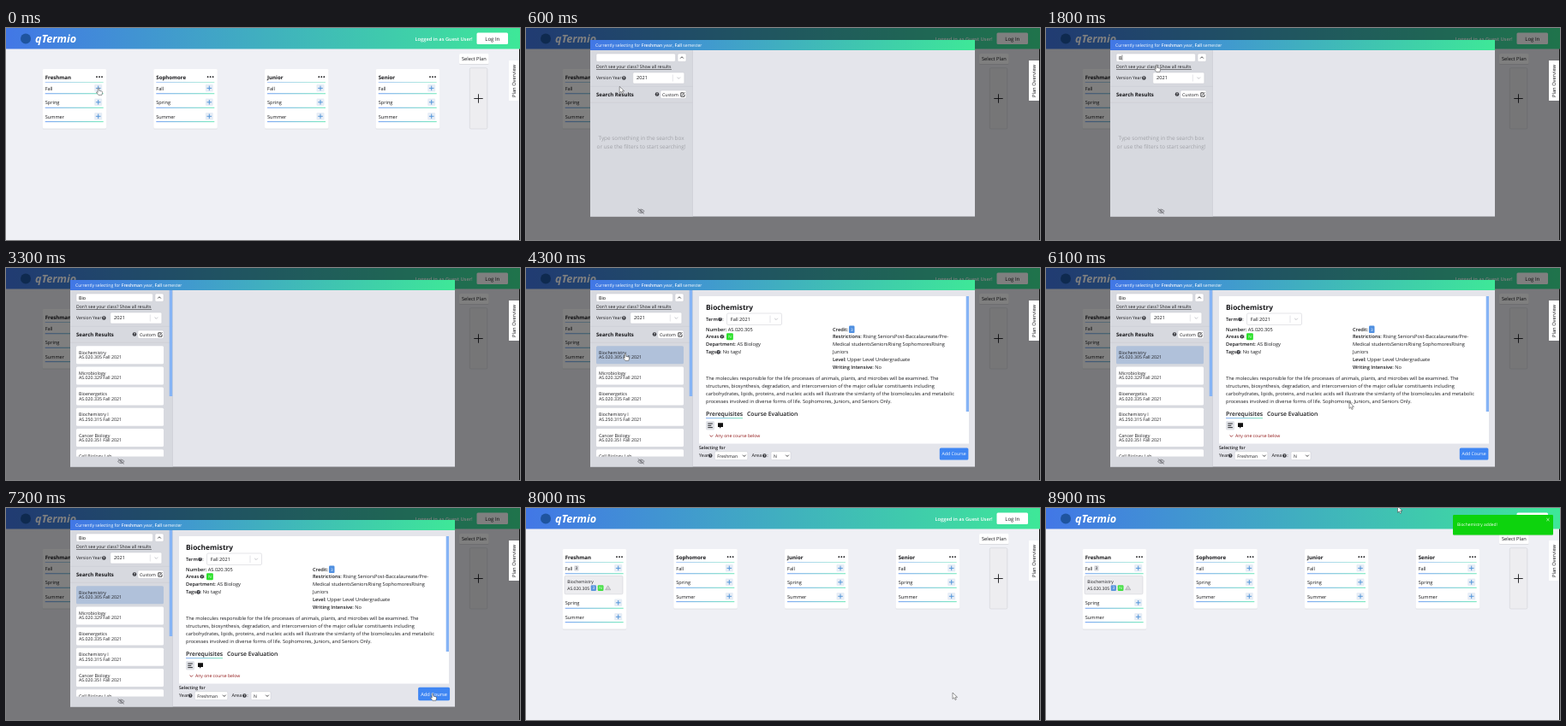
Animation, 600 px wide and 248 px high, one loop 9 s. Source, as an HTML page:

```html
<!DOCTYPE html>
<html lang="en">
<head>
<meta charset="utf-8">
<title>Course planner</title>
<style>
  html, body { margin: 0; width: 100%; height: 100%; overflow: hidden; background: #eff0f5; }
  svg { display: block; width: 100%; height: 100%; }
  text { font-family: "Open Sans", "Noto Sans", sans-serif; text-rendering: geometricPrecision; white-space: pre; }
</style>
</head>
<body>
<svg id="stage" viewBox="0 0 600 248"></svg>
<script>
const LOOP = 9000;
const stage = document.getElementById('stage');
const INK = '#18181b', BLUE = '#4a90d9', EDGE = '#c9cbd1';

// Markup helpers
const rect = (x, y, w, h, fill, extra = '') =>
  `<rect x="${x}" y="${y}" width="${w}" height="${h}" fill="${fill}" ${extra}/>`;
const text = (x, y, size, str, extra = '') =>
  `<text x="${x}" y="${y}" font-size="${size}" fill="${INK}" ${extra}>${str}</text>`;
const line = (d, stroke = INK, width = .7, extra = '') =>
  `<path d="${d}" fill="none" stroke="${stroke}" stroke-width="${width}" ${extra}/>`;
const group = (id, body, extra = '') => `<g id="${id}" ${extra}>${body}</g>`;
const bold = s => `<tspan font-weight="600">${s}</tspan>`;
const box = (x, y, w, h, fill = '#fff', extra = '') =>
  rect(x, y, w, h, fill, `rx="1.5" stroke="${EDGE}" stroke-width=".5" ${extra}`);
const chevron = (x, y, dir = 1, color = '#aaa') =>
  line(`M${x - 1.8} ${y - dir * .9}l1.8 ${dir * 1.8}l1.8 ${-dir * 1.8}`, color, .8);
const help = (x, y) =>
  `<circle cx="${x}" cy="${y}" r="2.3" fill="#33343a"/>` +
  text(x, y + 1.4, 4, '?', 'style="fill:#fff" font-weight="700" text-anchor="middle"');
const badge = (x, y, w, h, fill, label, color = '#fff') =>
  rect(x, y, w, h, fill, 'rx="1.2"') +
  text(x + w / 2, y + h / 2 + 1.7, 4.7, label, `style="fill:${color}" text-anchor="middle"`);
const select = (x, y, w, h, label, split = true) =>
  box(x, y, w, h) + text(x + (split ? 4.3 : 3), y + h / 2 + 1.9, split ? 5.6 : 5.1, label) +
  (split ? line(`M${x + w - 13.5} ${y + 2.5}v${h - 5}`, EDGE, .5) : '') +
  chevron(x + w - (split ? 6.5 : 4), y + h / 2, 1, split ? '#b5b7bc' : INK);

function yearCard(x, name, course) {
  const shift = course ? 24 : 0;
  const rule = y => rect(x + 3, y, 68, .8, 'url(#rule)');
  const term = (label, y) => text(x + 3, y, 5.6, label) + rule(y + 3.8) +
    rect(x + 60.5, y - 6.5, 9, 8.5, '#e6edf6', 'rx="1.2"') +
    line(`M${x + 62.2} ${y - 2.2}h5.6m-2.8 -2.8v5.6`, BLUE, .9);
  let body = rect(x, 48, 74.5, 69.5 + shift, '#fff', 'rx="1.5" filter="url(#soft)"') +
    text(x + 3, 60.2, 6.1, name, 'font-weight="700"') +
    [0, 3, 6].map(d => `<circle cx="${x + 63.3 + d}" cy="57.2" r=".9" fill="${INK}"/>`).join('') +
    rect(x + 3, 63.4, 68, .6, 'url(#rule)', 'opacity=".75"') +
    term('Fall', 72.6) + term('Spring', 89 + shift) + term('Summer', 105.5 + shift);
  if (course) {
    body += badge(x + 13.5, 67.3, 5.5, 6.4, '#dcdde2', '3', INK) +
      box(x + 2.3, 79.3, 68, 21.5, '#ededf0') +
      text(x + 5.5, 87.6, 5.05, 'Biochemistry') + text(x + 5.5, 95.6, 5.05, 'AS.020.305') +
      badge(x + 33, 90.3, 6.3, 6.6, '#5b95dd', '3') +
      badge(x + 41, 90.3, 6.8, 6.6, '#44e044', 'N') +
      line(`M${x + 50} 95.7h6l-1-1.6h-4zm1.3 -1.8l1.7-3l1.7 3`, '#8d8d92', .6);
  }
  return body;
}

const planner = () =>
  rect(0, 0, 600, 248, '#eff0f5') + rect(0, 0, 600, 24.5, 'url(#bar)') +
  '<circle cx="23" cy="12.5" r="6" fill="#1f549f"/>' +
  text(34, 17.3, 12.6, 'qTermio', 'style="fill:#fff" font-weight="700" font-style="italic"') +
  text(477.5, 14.6, 5.7, 'Logged in as Guest User!', 'style="fill:#fff" font-weight="600"') +
  rect(549.5, 5.5, 36.5, 13.5, '#fff', 'rx="1.5"') +
  text(567.8, 14.6, 6, 'Log In', 'text-anchor="middle"') +
  rect(529, 30, 34.5, 12, '#fff', 'rx="1.5" filter="url(#soft)"') +
  text(546.3, 38.2, 5.7, 'Select Plan', 'text-anchor="middle"') +
  box(541.3, 46.7, 20.5, 71.3, '#ededf0') + line('M546.3 82.5h10.4m-5.2 -5.2v10.4', INK, .9) +
  group('emptyYear', yearCard(42.7, 'Freshman', false)) +
  group('filledYear', yearCard(42.7, 'Freshman', true)) +
  ['Sophomore', 'Junior', 'Senior'].map((n, i) => yearCard(172.3 + i * 129.7, n, false)).join('');

const sideTab = () =>
  rect(587, 38, 12.2, 47, '#fff') +
  text(0, 0, 5.75, 'Plan Overview', 'transform="translate(595 62) rotate(-90)" text-anchor="middle"') +
  rect(599, 24.5, 1, 223.5, '#111');

const courses = [
  ['Biochemistry', '020.305'], ['Microbiology', '020.329'], ['Bioenergetics', '020.335'],
  ['Biochemistry I', '250.315'], ['Cancer Biology', '020.351'], ['Cell Biology Lab', '020.316']
];
const results = () => courses.map(([name, code], i) => {
  const y = 91.2 + i * 24.2;
  return rect(82, y, 102, 21, '#fff', `rx="1.5" ${i ? '' : 'id="firstResult"'}`) +
    text(85, y + 9.6, 5.25, name) + text(85, y + 15, 5.25, `AS.${code} Fall 2021`);
}).join('');

const searchPanel = () =>
  line('M75 68.3H194.5M75 87.2H194.5', '#c8cad0', .6) +
  box(82, 30, 92.5, 9.3, '#fff', 'id="queryBox"') +
  '<text id="query" x="85" y="36.6" font-size="5.4"></text>' +
  rect(0, 31.5, .5, 6.3, INK, 'id="caret"') +
  text(82, 47.2, 5.1, "Don't see your class? Show all results") + rect(82, 48, 88, .5, INK) +
  text(82, 60.4, 5.1, 'Version Year') + help(114.3, 58.5) +
  text(82, 80, 6.05, 'Search Results', 'font-weight="700"') +
  group('rightAligned',
    box(177, 30, 10, 9.3) + chevron(182, 34.6, -1, INK) + select(124.8, 52, 60, 13, '2021') +
    help(153, 77.5) + box(157, 73, 30, 9.3) + text(159, 79.6, 5.2, 'Custom') +
    line('M184 75.8h-3.2v4.4h4.2v-2.6M182.3 78.7l3-3.4', INK, .8)) +
  group('hint', ['Type something in the search box', 'or use the filters to start searching!']
    .map((s, i) => text(134.5, 130.6 + i * 10.6, 6.4, s, 'style="fill:#a0a2a8" text-anchor="middle"')).join('')) +
  group('results', `<g clip-path="url(#listClip)">${results()}</g>` + rect(190.7, 26, 3.5, 124, '#86b4f5')) +
  group('eye', line('M-3.8 0q3.8-4.4 7.6 0q-3.8 4.4-7.6 0zM-3.6-3.1L3.6 3.1', '#4a4b50', .6) +
    line('M-1.1 0a1.1 1.1 0 1 0 2.2 0a1.1 1.1 0 1 0-2.2 0', '#4a4b50', .5));

function detailPanel() {
  const left = 210, right = 358, size = 5.66;
  const description = [
    'The molecules responsible for the life processes of animals, plants, and microbes will be examined. The',
    'structures, biosynthesis, degradation, and interconversion of the major cellular constituents including',
    'carbohydrates, lipids, proteins, and nucleic acids will illustrate the similarity of the biomolecules and metabolic',
    'processes involved in diverse forms of life. Sophomores, Juniors, and Seniors Only.'
  ];
  const facts = [
    [left, 74, bold('Number:') + ' AS.020.305'], [left, 82.4, bold('Areas')],
    [left, 91.3, bold('Department:') + ' AS Biology'], [left, 100.3, bold('Tags')], [226.8, 100.3, ': No tags!'],
    [right, 74, bold('Credit:')], [right, 82.4, bold('Restrictions:') + ' Rising SeniorsPost-Baccalaureate/Pre-'],
    [right, 91.3, 'Medical studentsSeniorsRising SophomoresRising'], [right, 100.3, 'Juniors'],
    [right, 109.2, bold('Level:') + ' Upper Level Undergraduate'], [right, 118.2, bold('Writing Intensive:') + ' No']
  ];
  return rect(202, 33, 315, 172.5, '#fff') + rect(513.7, 33, 3.3, 135, '#86b4f5') +
    text(left, 48.6, 8.35, 'Biochemistry', 'font-weight="700"') +
    text(left, 62.3, size, bold('Term')) + help(226.6, 60) + text(229.2, 62.3, size, ':') +
    select(234.5, 53, 64, 13.5, 'Fall 2021') +
    facts.map(([x, y, s]) => text(x, y, size, s)).join('') +
    help(228.8, 80.3) + text(231.3, 82.4, size, ':') + help(224.6, 98.4) +
    badge(234, 76.3, 7.8, 8, '#2be02b', 'N') + badge(377, 67.5, 6.5, 8.6, '#4f8fe0', '3') +
    description.map((s, i) => text(left, 131.2 + i * 9, size, s)).join('') +
    text(left, 173.2, 6.8, 'Prerequisites', 'font-weight="600"') +
    text(258, 173.2, 6.8, 'Course Evaluation', 'font-weight="600"') + rect(left, 175.4, 43, .7, 'url(#rule)') +
    rect(210, 179, 10, 10.5, '#e1e3e8', 'rx="1.5"') +
    line('M212.3 182h5.5M212.3 184.3h4M212.3 186.6h5.5', INK, .9) +
    '<path d="M224 181.3h6v4.7h-2.3l-1.6 1.8v-1.8h-2.1z" fill="#111"/>' +
    chevron(216.3, 196.5, 1, '#8f1515') + text(221, 198.4, 5.1, 'Any one course below', 'style="fill:#8f1515"') +
    text(202, 212.3, 5.1, 'Selecting for', 'font-weight="600"') +
    text(202, 221.4, 5.5, 'Year') + help(215.2, 219.5) + select(220.3, 214.7, 38.5, 9.8, 'Freshman', false) +
    text(263.5, 221.4, 5.5, 'Area') + help(278.4, 219.5) + text(281.3, 221.4, 5.5, ':') +
    select(286, 214.7, 23, 9.8, 'N', false) +
    group('addButton', rect(-16.8, -7, 33.6, 14, '#3f86f3', 'rx="1.5"') +
      text(0, 1.9, 5.2, 'Add Course', 'style="fill:#fff" text-anchor="middle"'));
}

const modal = () =>
  rect(0, 0, 600, 248, '#000', 'opacity=".5"') +
  rect(75, 14, 449, 206.5, '#e4e5eb', 'id="sheet"') +
  rect(75, 14, 119.5, 206.5, '#d7d9df', 'id="sheetSide"') +
  rect(194.2, 14, .6, 206.5, '#c8cad0', 'id="divider"') +
  rect(75, 14, 449, 12, 'url(#bar)') +
  text(81, 21.8, 5.1, `Currently selecting for ${bold('Freshman')} year, ${bold('Fall')} semester`, 'style="fill:#fff"') +
  searchPanel() + group('detail', detailPanel());

const toast = () =>
  rect(475, 8, 117, 23.5, '#0bd30b', 'rx="1.2" filter="url(#soft)"') +
  text(480, 21.4, 4.9, 'Biochemistry added!', 'style="fill:#fff"') +
  line('M584.3 12l3.2 3.2m0-3.2l-3.2 3.2', '#dfffdf', .7);

const pointer = () =>
  group('arrow', '<path d="M0 0v7.4l1.8-1.6l1.2 2.7l1.3-.6l-1.2-2.6h2.4z" fill="#fff" stroke="#333" stroke-width=".5"/>') +
  group('hand', '<path d="M-.8 .6q.8-1.2 1.6 0v2.7l3 .8q1 .3.8 1.4l-.7 2.9h-4l-2.5-3.2q.3-1.1 1.8.2z" fill="#fff" stroke="#333" stroke-width=".5"/>');

const gradient = (id, a, b) =>
  `<linearGradient id="${id}"><stop stop-color="${a}"/><stop offset="1" stop-color="${b}"/></linearGradient>`;

stage.innerHTML = '<defs>' + gradient('bar', '#4277e6', '#3ee898') + gradient('rule', '#4a86ee', '#45dfa8') +
  '<filter id="soft" x="-10%" y="-10%" width="120%" height="125%"><feDropShadow dx="0" dy=".5" stdDeviation=".7" flood-opacity=".16"/></filter>' +
  '<clipPath id="listClip"><rect x="75" y="87" width="119" height="133.5"/></clipPath></defs>' +
  planner() + group('modal', modal()) + group('tab', sideTab()) + group('toast', toast()) + group('pointer', pointer());

const el = Object.fromEntries([...stage.querySelectorAll('[id]')].map(n => [n.id, n]));
const show = (id, on) => { el[id].style.display = on ? '' : 'none'; };
const between = (t, a, b) => t >= a && t < b;
const ease = p => p * p * (3 - 2 * p);

// Pointer stops: time, x, y
const stops = [
  [0, 108, 70], [500, 108, 70], [1200, 129, 43], [3400, 129, 43], [3800, 116, 100],
  [4300, 116, 100], [4950, 354, 157], [6200, 354, 157], [6900, 498, 217],
  [8000, 498, 216], [8150, 498, 216], [8800, 410.5, -2], [LOOP, 410.5, -2]
];
function pointerAt(t) {
  const i = stops.findIndex(s => s[0] > t);
  const [t0, x0, y0] = stops[i - 1], [t1, x1, y1] = stops[i];
  const p = ease((t - t0) / (t1 - t0));
  return [x0 + (x1 - x0) * p, y0 + (y1 - y0) * p];
}

function render(t) {
  const open = between(t, 400, 7500), found = t >= 2800, chosen = t >= 4000, added = t >= 7500;
  show('modal', open);
  show('emptyYear', !added);
  show('filledYear', added);
  show('results', found);
  show('hint', !found);
  show('detail', chosen);
  for (const id of ['sheet', 'sheetSide', 'divider']) el[id].setAttribute('height', found ? 218.5 : 206.5);
  el.eye.setAttribute('transform', `translate(134.3 ${found ? 226.3 : 214.3})`);
  el.firstResult.setAttribute('fill', chosen ? '#b0c1da' : '#fff');

  // The list's scrollbar narrows the search panel
  const inset = found ? 3 : 0;
  el.rightAligned.setAttribute('transform', `translate(${-inset} 0)`);
  el.queryBox.setAttribute('width', 92.5 - inset);

  const typed = [1700, 1900, 2100].filter(k => t >= k).length;
  el.query.textContent = 'Bio'.slice(0, typed);
  el.caret.setAttribute('x', 85.2 + [0, 3.5, 4.9, 8.2][typed]);
  show('caret', between(t, 1300, 3200) && (t < 2200 || t % 1000 < 500));

  show('toast', t >= 8300);
  const slide = 1 - Math.min(1, Math.max(0, (t - 8300) / 350));
  el.toast.setAttribute('transform', `translate(${125 * slide ** 3} 0)`);

  const hovering = between(t, 6800, 7500);
  el.addButton.setAttribute('transform', `translate(499.6 217.5) scale(${hovering ? 1.1 : 1})`);

  const [x, y] = pointerAt(t);
  const hand = t < 550 || between(t, 1100, 2000) || between(t, 3650, 4450) || hovering;
  el.pointer.setAttribute('transform', `translate(${x} ${y})`);
  show('pointer', !between(t, 2000, 3400));
  show('hand', hand);
  show('arrow', !hand);
}

const start = performance.now();
function tick() {
  render((performance.now() - start) % LOOP);
  requestAnimationFrame(tick);
}
tick();
</script>
</body>
</html>
```
